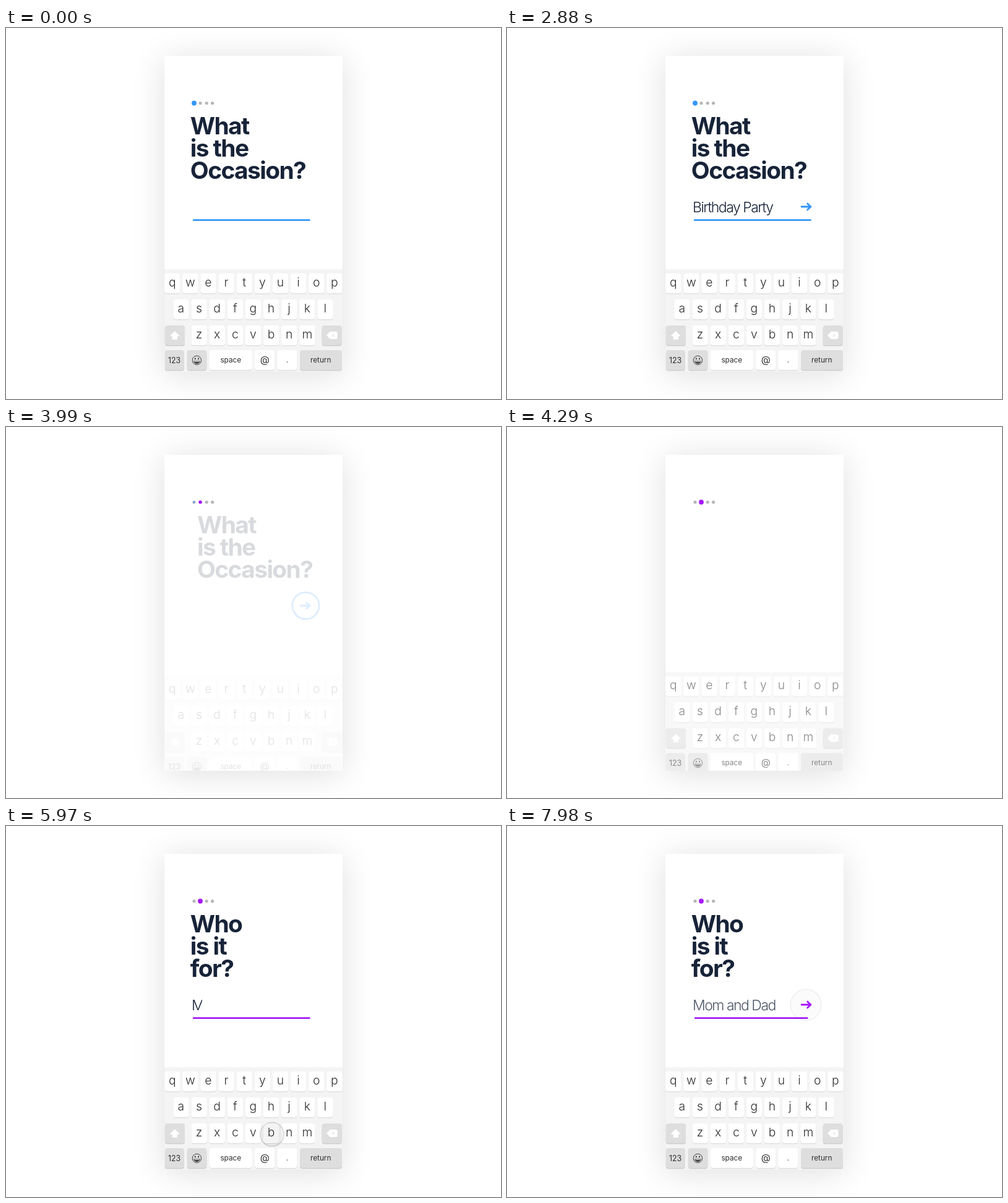
Recreate the animation shown at these times as an HTML page. Size 800 by 600 pixels, loop 8000 ms.

```html
<!DOCTYPE html>
<html lang="en">
<head>
<meta charset="utf-8">
<title>Event form</title>
<style>
html, body { margin: 0; width: 100%; height: 100%; overflow: hidden; background: #fff; }
body { position: relative; }
.phone {
  position: absolute; left: 256px; top: 45px; width: 288px; height: 511px;
  background: #fff; box-shadow: 0 5px 50px rgba(0, 0, 0, .13);
}
svg { position: absolute; left: 0; top: 0; width: 800px; height: 600px; display: block; }
text { font-family: Inter, Roboto, "Liberation Sans", sans-serif; font-optical-sizing: none; }
.title { font-size: 38.8px; font-weight: 700; letter-spacing: -.04em; fill: #172338; }
.answer { font-size: 23px; font-weight: 300; letter-spacing: -1.5px; fill: #172338; }
.keys text { text-anchor: middle; fill: #2e2e2e; }
.letter { font-size: 19.3px; font-weight: 300; }
.label { font-size: 11.8px; }
.stroke { fill: none; stroke: var(--c); stroke-width: 2.8; stroke-linecap: round; stroke-linejoin: round; }
.touch { fill: rgba(0, 0, 0, .045); stroke: rgba(0, 0, 0, .14); stroke-width: 1.5; }
</style>
</head>
<body>
<div class="phone"></div>
<svg viewBox="0 0 800 600">
  <defs>
    <clipPath id="screen"><rect x="256" y="45" width="288" height="511"/></clipPath>
    <clipPath id="typed"><rect id="wipe" x="301" y="270" width="0" height="38"/></clipPath>
  </defs>
  <g id="dots"></g>
  <g id="title0" class="title">
    <text x="297.8" y="171.5">What</text>
    <text x="297.8" y="207.7">is the</text>
    <text x="297.8" y="243.9">Occasion?</text>
  </g>
  <g id="title1" class="title">
    <text x="297.8" y="171.5">Who</text>
    <text x="297.8" y="207.7">is it</text>
    <text x="297.8" y="243.9">for?</text>
  </g>
  <g clip-path="url(#typed)"><text id="answer" class="answer" x="300" y="297.7"></text></g>
  <g clip-path="url(#screen)"><g id="keys" class="keys"></g></g>
  <circle id="press" class="touch" cx="483.2" cy="289.3"/>
  <g id="field">
    <path id="line" class="stroke"/>
    <path id="arrow" class="stroke" d="M476 289H490.6M485.6 283.9L490.9 289L485.6 294.1"/>
  </g>
  <g id="taps"></g>
</svg>
<script>
const LOOP = 8000, BLUE = '#3296fb', PURPLE = '#a519fb';
const NS = 'http://www.w3.org/2000/svg';
const $ = id => document.getElementById(id);

function add(parent, tag, attrs, text) {
  const el = document.createElementNS(NS, tag);
  set(el, attrs);
  if (text) el.textContent = text;
  parent.appendChild(el);
  return el;
}
function set(el, attrs) {
  for (const k in attrs) el.setAttribute(k, attrs[k]);
}

const clamp = u => Math.max(0, Math.min(1, u));
const ramp = (t, a, b) => clamp((t - a) / (b - a));
const mix = (a, b, u) => a + (b - a) * u;
const outQuad = u => 1 - (1 - u) ** 2;
const outCubic = u => 1 - (1 - u) ** 3;
const inOut = u => u * u * (3 - 2 * u);

// Keyboard
const keys = $('keys');
function key(x, y, w, gray) {
  const box = { x, width: w, height: 32, rx: 4 };
  add(keys, 'rect', { ...box, y: y + 1.4, fill: gray ? '#cecece' : '#dfdfdf' });
  add(keys, 'rect', { ...box, y, fill: gray ? '#dedede' : '#fff' });
}
function buildKeys() {
  add(keys, 'rect', { x: 256, y: 390, width: 288, height: 200, fill: '#f4f4f4' });
  const rows = [['qwertyuiop', 256.2, 397], ['asdfghjkl', 270.4, 439], ['zxcvbnm', 299.6, 481]];
  for (const [chars, x0, y] of rows) {
    [...chars].forEach((ch, i) => {
      const x = x0 + i * 29.12;
      key(x, y, 25.2);
      add(keys, 'text', { x: x + 12.5, y: y + 21.2, class: 'letter' }, ch);
    });
  }
  key(256.8, 481, 32.2, true);
  add(keys, 'path', { d: 'M272.8 490.6L280.2 498H276.5V503.3H269.1V498H265.4Z', fill: '#fff',
    stroke: '#fff', 'stroke-width': 1, 'stroke-linejoin': 'round' });
  key(510.6, 481, 32.2, true);
  add(keys, 'path', { d: 'M518.6 497L523.8 491.5H533.5Q535 491.5 535 493V501Q535 502.5 533.5 502.5H523.8Z',
    fill: '#fff', stroke: '#fff', 'stroke-width': 1, 'stroke-linejoin': 'round' });
  add(keys, 'path', { d: 'M526.6 494.8L531 499.2M531 494.8L526.6 499.2', stroke: '#dedede', 'stroke-width': 1 });

  key(256.8, 521, 31, true);
  key(292.8, 521, 31.6, true);
  key(329, 521, 69);
  key(402, 521, 32.2);
  key(438.2, 521, 32.2);
  key(475, 521, 68, true);
  const label = (x, y, s, size) => add(keys, 'text', { x, y, class: 'label', style: size ? `font-size:${size}px` : '' }, s);
  label(272, 541.8, '123', 12.4);
  label(363.3, 541, 'space');
  label(418.2, 542.3, '@', 15.5);
  label(454.4, 541, '.');
  label(508.7, 541, 'return');

  add(keys, 'circle', { cx: 308.4, cy: 537.4, r: 7.2, fill: 'none', stroke: '#3a3a3a', 'stroke-width': 1 });
  for (const x of [305.8, 311]) add(keys, 'ellipse', { cx: x, cy: 535, rx: 1, ry: 1.4, fill: '#3a3a3a' });
  add(keys, 'path', { d: 'M303.2 538.4H313.6A5.2 4.8 0 0 1 303.2 538.4Z', fill: '#3a3a3a' });
  add(keys, 'path', { d: 'M304.4 539.6H312.4', stroke: '#dedede', 'stroke-width': 1 });
}
buildKeys();

const dots = [304, 314, 324.2, 333.6].map(x => add($('dots'), 'circle', { cx: x, cy: 121.5, r: 2.6, fill: '#b6b6b6' }));
const marks = [[304, BLUE], [314, PURPLE]].map(([x, c]) => add($('dots'), 'circle', { cx: x, cy: 121.5, fill: c }));

// Key touches: start within the typing, x, y
const touches = [[0, 430, 498.7], [600, 488, 498.5], [740, 299, 413]];
const taps = touches.map(([, x, y]) => add($('taps'), 'circle', { class: 'touch', cx: x, cy: y }));

function touch(el, u) {
  const live = u > 0 && u < 1;
  set(el, {
    r: mix(19.3, 25, ramp(u, .34, .7)),
    opacity: live ? ramp(u, 0, .15) * (1 - ramp(u, .42, 1)) : 0
  });
}

function typedWidth(t) {
  const pts = [[0, 0], [120, 16], [540, 51.3], [1080, 136]];
  for (let i = 1; i < pts.length; i++) {
    const [a, w0] = pts[i - 1], [b, w1] = pts[i];
    if (t < b) return mix(w0, w1, ramp(t, a, b));
  }
  return 140;
}

// The underline runs on into a ring around the arrow
const X0 = 303.2, X1 = 484.4, Y = 310.7, R = 21.7;
const RUN = X1 - X0, RING = 2 * Math.PI * R;
function linePath(from, to) {
  const start = Math.min(from, RUN);
  let d = `M${X0 + start} ${Y}H${X0 + Math.min(to, RUN)}`;
  const turn = Math.min((to - RUN) / RING, .9999);
  if (turn > 0) {
    const a = Math.PI / 2 - turn * 2 * Math.PI;
    d += `A${R} ${R} 0 ${turn > .5 ? 1 : 0} 0 ${X1 + R * Math.cos(a)} ${Y - R + R * Math.sin(a)}`;
  }
  return d;
}

function render(t) {
  const second = t >= 4200;
  const typing = t - (second ? 5850 : 1200);
  const sent = t - (second ? 7530 : 2880);

  const leave = ramp(t, 3690, 4050);
  set($('title0'), { opacity: 1 - leave, transform: `translate(${16 * leave * leave} 0)` });
  set($('title1'), {
    opacity: ramp(t, 4400, 4620),
    transform: `translate(${-22 * (1 - outCubic(ramp(t, 4400, 5200)))} 0)`
  });

  const swap = inOut(ramp(t, 3780, 4110));
  set(marks[0], { r: 3.9 * (1 - swap), opacity: swap < 1 ? 1 : 0 });
  set(marks[1], { r: 3.9 * swap, opacity: swap > 0 ? 1 : 0 });

  const away = t < 4080 ? inOut(ramp(t, 3690, 4080)) : 1 - inOut(ramp(t, 4080, 4470));
  set(keys, { transform: `translate(0 ${14 * away})`, opacity: 1 - away });

  $('answer').textContent = second ? 'Mom and Dad' : 'Birthday Party';
  set($('answer'), { opacity: 1 - ramp(sent, 350, 790) });
  set($('wipe'), { width: typedWidth(typing) });
  touches.forEach(([start], i) => touch(taps[i], (typing - start) / 360));
  touch($('press'), sent / 600);

  const full = RUN + 6;
  let from = 0, to = full;
  if (second && t < 5520) to = full * outQuad(ramp(t, 4300, 5520));
  else if (sent > 450) {
    const u = outQuad(ramp(sent, 450, 780));
    from = RUN * u;
    to = RUN + RING * u;
  } else to = full - 6 * ramp(sent, 330, 450);
  // Before the ring begins the line is plain and straight
  const d = sent > 450 ? linePath(from, to) : `M${X0} ${Y}H${X0 + to}`;
  set($('line'), { d, opacity: second && t < 4310 ? 0 : 1 });

  const show = ramp(typing, 390, 690);
  set($('arrow'), { opacity: show, transform: `translate(${-12 * (1 - outCubic(show))} 0)` });
  set($('field'), { opacity: second ? 1 : 1 - leave });
  $('field').style.setProperty('--c', second ? PURPLE : BLUE);
}

const begin = performance.now();
function tick() {
  render((performance.now() - begin) % LOOP);
  requestAnimationFrame(tick);
}
tick();
</script>
</body>
</html>
```
